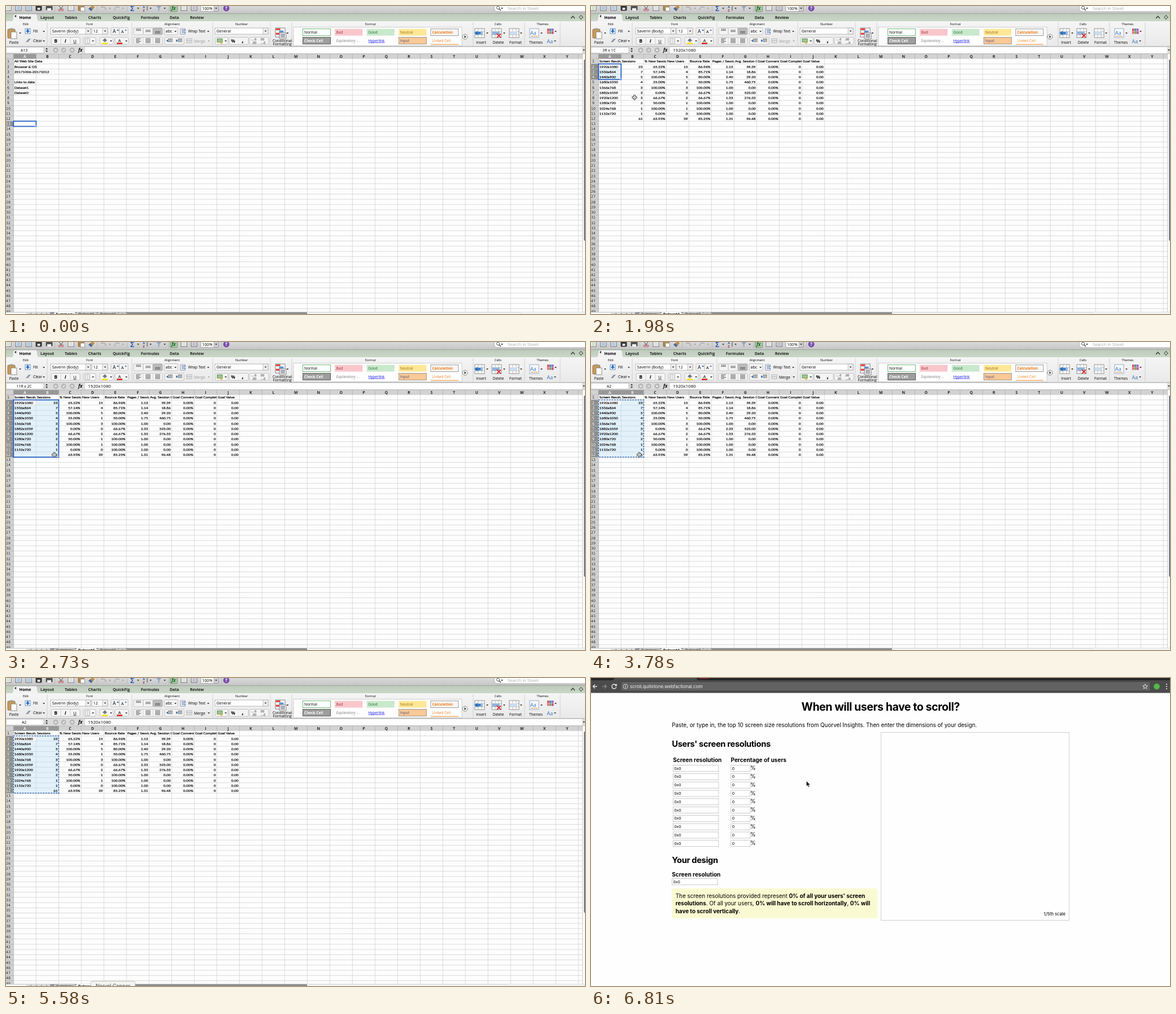
An HTML page that plays this animation: 1025 by 546 pixels, repeating every 8000 ms.

```html
<!DOCTYPE html>
<html lang="en">
<head>
<meta charset="utf-8">
<title>Spreadsheet to scroll checker</title>
<style>
html, body { margin: 0; width: 100%; height: 100%; overflow: hidden; background: #fff; }
svg#stage { display: block; width: 100vw; height: 100vh; }
text { font-family: "Open Sans", sans-serif; fill: #000; }
.cell { font-family: Lato, Carlito, sans-serif; stroke: #000; stroke-width: .2px; }
.web { font-family: Inter, sans-serif; }
.num { font-family: "DejaVu Sans", sans-serif; }
.m { text-anchor: middle; }
.e { text-anchor: end; }
.b { font-weight: 700; }
.h { font-weight: 700; letter-spacing: -.022em; }
.i { font-style: italic; }
</style>
</head>
<body>
<svg id="stage" viewBox="0 0 1025 546" xmlns="http://www.w3.org/2000/svg"></svg>
<script>
const LOOP = 8000;
const range = n => [...Array(n).keys()];
const each = (list, f) => list.map(f).join('');
const clamp = (v, a, b) => Math.max(a, Math.min(b, v));

// Drawing helpers, all returning SVG markup
const box = (x, y, w, h, fill, stroke, rx = 0) =>
  `<rect x="${x}" y="${y}" width="${w}" height="${h}" rx="${rx}" fill="${fill || 'none'}"${stroke ? ` stroke="${stroke}" stroke-width=".8"` : ''}/>`;
const txt = (x, y, s, size, cls = '', fill = '') =>
  `<text x="${x}" y="${y}" font-size="${size}" class="${cls}"${fill ? ` style="fill:${fill}"` : ''}>${s}</text>`;
const line = (d, stroke, w = .8, fill = 'none') =>
  `<path d="${d}" fill="${fill}" stroke="${stroke}" stroke-width="${w}"/>`;
const shape = (d, fill) => `<path d="${d}" fill="${fill}"/>`;
const dot = (x, y, r, fill, stroke = 'none') =>
  `<circle cx="${x}" cy="${y}" r="${r}" fill="${fill}" stroke="${stroke}" stroke-width=".8"/>`;
const drop = (x, y, c = '#333') => shape(`M${x - 1.9} ${y - 1}h3.8l-1.9 2.6z`, c);
const grad = (id, a, b) =>
  `<linearGradient id="${id}" x2="0" y2="1"><stop stop-color="${a}"/><stop offset="1" stop-color="${b}"/></linearGradient>`;
const group = (id, s) => `<g id="${id}">${s}</g>`;

// Sheet geometry
const COL = 40, ROW = 9.234;
const X = c => 13.3 + COL * c;
const Y = r => 93.4 + ROW * (r - 1);
const colName = (c, fill) => txt(X(c) + 20, 91.7, String.fromCharCode(65 + c), 6.8, 'm b', fill);
const rowName = (r, fill) => txt(4, Y(r) + 7, r, 6.3, 'm num', fill);

function toolbar() {
  const mini = (x, fill, ink) => box(x - 5, -3, 10, 11, fill, '#555') + line(`M${x - 3} 2h6M${x - 3} 5h6`, ink);
  return box(0, 0, 1025, 14, 'url(#top)') +
    mini(4, '#fff', '#4b9b4b') + mini(22, '#dfeaf7', '#2c62a8') + mini(40, '#d8e8f2', '#3d7fae') +
    box(53, -3, 10, 11, '#333', '#222', 1) + box(55.5, 3, 5, 4, '#ddd') +
    box(71, 0, 11, 7, '#555', '#333', 1) + box(73, 4, 7, 4, '#fff') +
    line('M94 0l5 6M101 0l-5 6', '#444', 1) + dot(95, 7, 1.8, 'none', '#b33') + dot(100, 7, 1.8, 'none', '#b33') +
    mini(115, '#fff', '#888') + box(128, -3, 10, 11, '#b98949', '#7a5a30', 1) + box(132, 2, 7, 7, '#fff', '#888') +
    shape('M146 5l7-6 4 3-6 7z', '#c58a3c') + shape('M146 5l3-3 4 4-2 3z', '#3a6cb0') +
    line('M168 3q7-4 9 4', '#b9a9a0', 1.6) + drop(184, 4, '#999') + line('M201 3q-7-4-9 4', '#a6b4be', 1.6) + drop(207, 4, '#999') +
    txt(220, 9, 'Σ', 12, 'b', '#2a5fb4') + drop(234, 4) +
    txt(242, 4, 'A', 6, 'b', '#2a5fb4') + txt(242, 10, 'Z', 6, 'b', '#a33') + line('M250 0v8', '#444', 1) + drop(256, 4) +
    shape('M266 0h9l-3.5 4v5l-2-1v-4z', '#8fa6bd') + drop(281, 4) +
    box(290.5, -3, 13, 13, '#a8c8a2', '#658a62', 2) + txt(293, 7, 'fx', 8, 'i b', '#135c1c') +
    mini(315, '#f4f4f4', '#aaa') + mini(333, '#d6e4f4', '#b05050') +
    box(345, -2, 31, 11.5, '#fff', '#999') + box(368, -2, 8, 11.5, '#cfcfcf', '#999') + txt(347, 7, '100%', 7.3) + drop(372, 4) +
    dot(390, 4, 5, '#7d4db3', '#5c3590') + txt(390, 7, '?', 8, 'm b', '#fff') +
    line('M86.5 0v11M161.5 0v11M214.5 0v11M287.5 0v11M381.5 0v11', '#aaa', .6) +
    box(864, -3, 170, 13, '#fff', '#999', 6) + dot(871, 3, 2.6, 'none', '#333') + line('M873 5l3 3', '#333', 1.2) +
    drop(878, 4) + txt(888, 7, 'Search in Sheet', 7.7, '', '#aaa');
}

function tabs() {
  const names = [['Layout', 73], ['Tables', 115], ['Charts', 157], ['QuickFig', 204], ['Formulas', 255], ['Data', 298], ['Review', 338]];
  return box(0, 13.5, 1025, 13.5, 'url(#tab)') + line('M0 13.5h1025', '#8d978c', .7) +
    shape('M10 27q3-1 3-6v-3q0-3.5 4-3.5h34q4 0 4 3.5v3q0 5 3 6z', '#f2f2f2') +
    shape('M15 18l3-2.6v5.2z', '#333') + txt(34, 22.7, 'Home', 7.1, 'm b') +
    each(names, ([s, x]) => txt(x, 22.7, s, 7, 'm b', '#222')) +
    line('M1000 22l3.5-4 3.5 4', '#333', 1.3) + dot(1018, 20, 2.6, 'none', '#444') +
    line('M1018 16v2M1018 22v2M1014 20h2M1020 20h2', '#444', 1.2);
}

function gallery() {
  const styles = [
    ['Normal', '#fff', '#49a855', '', '#000'], ['Bad', '#f8c7cc', '', '', '#a5343c'], ['Good', '#cae8cc', '', '', '#20752c'],
    ['Neutral', '#ffe798', '', '', '#a06c10'], ['Calculation', '#f6f6f6', '#888', 'b', '#ee7d18'],
    ['Check Cell', '#9e9e9e', '#444', 'b', '#fff'], ['Explanatory ...', '#fff', '', 'i', '#808080'], ['Hyperlink', '#fff', '', '', '#1414e6'],
    ['Input', '#fbc996', '#888', '', '#4a4a7c'], ['Linked Cell', '#fff', '', '', '#f08020']];
  return box(509, 37.5, 298, 33, '#fdfdfd', '#c4c4c4') +
    each(styles, ([s, fill, edge, cls, ink], i) => {
      const x = 525.5 + 56.6 * (i % 5), y = i < 5 ? 40.5 : 55.5;
      return box(x, y, 49, 12, fill, edge) + txt(x + 2.5, y + 8.3, s, 6.5, cls, ink);
    }) +
    line('M641.5 65h29', '#1414e6', .7) + line('M752 68h49', '#f08020', 1) +
    dot(812.5, 54.5, 4.5, '#eee', '#777') + shape('M811.5 52l3 2.5-3 2.5z', '#333');
}

function ribbon() {
  const groups = [['Edit', 35], ['Font', 148], ['Alignment', 294], ['Number', 417], ['Format', 645], ['Cells', 871], ['Themes', 950]];
  const bars = (x, y, ws, c = '#555') => each(ws, (w, i) => box(x, y + i * 2.3, w, 1, c));
  const btn = (x, y, w, fill = '#f4f4f4') => box(x, y, w, 12.5, fill, '#b5b5b5', 1.5);
  const field = (x, w, s) => box(x, 39, w, 11, '#fff', '#a5a5a5') + box(x + w - 9, 39, 9, 11, '#eee', '#b5b5b5') +
    drop(x + w - 4.5, 44.5) + txt(x + 2.5, 47.2, s, 7);
  const table = (x, ink) => box(x - 8, 40, 17, 16, '#fff', '#777') + line(`M${x - 8} 45.5h17M${x - 8} 51h17M${x - 2} 40v16M${x + 4} 40v16`, '#999', .7) + box(x - 7, 45, 13, 6, ink);
  return box(0, 27, 1025, 44.5, 'url(#rib)') +
    each([73, 223, 366, 468, 506, 827, 918, 981], x => line(`M${x} 29v41`, '#c4c4c4', .7)) +
    each(groups, ([s, x]) => txt(x, 34.3, s, 5.7, 'm')) +
    // Edit
    box(3, 41, 13, 16, '#c79a5a', '#85602c', 1.5) + box(6.5, 39.5, 6, 3, '#999') + box(9, 46, 10, 12, '#fff', '#777') + drop(25, 48) +
    txt(14, 67, 'Paste', 6.5, 'm') +
    box(34, 40, 9, 9, '#e4eefa', '#4a83c4') + shape('M37 41h3v3h2l-3.5 4-3.5-4h2z', '#2e70bd') + txt(48, 47.3, 'Fill', 6.6) + drop(67, 45) +
    shape('M35 64l5-6h4l-5 6z', '#8a98ae') + txt(48, 64.3, 'Clear', 6.6) + drop(67, 62) +
    // Font
    field(79, 71, 'Saverin (Body)') + field(152, 28, '12') +
    btn(186, 38.5, 15) + btn(201, 38.5, 15) + txt(189, 48, 'A', 8.5) + txt(204, 47.5, 'A', 7) +
    shape('M196 44l2-3 2 3z', '#2e70bd') + drop(212, 43, '#2e70bd') +
    btn(80, 55.5, 51) + line('M97 55.5v12.5M114 55.5v12.5', '#c5c5c5', .7) +
    txt(88, 65, 'B', 8.5, 'm b') + txt(105, 65, 'I', 8.5, 'm i b') + txt(122, 64.5, 'U', 8, 'm') + line('M119 66.3h6', '#111', .7) +
    btn(137, 55.5, 22) + box(140, 58, 8, 8, '#fff', '#999') + line('M144 58v8M140 62h8', '#aaa', .6) + drop(154, 62) +
    btn(166, 55.5, 24) + shape('M171 61l4-4 4 4-4 3z', '#778') + box(170, 65, 10, 2.5, '#ffe600') + drop(186, 62) +
    btn(193, 55.5, 24) + txt(201, 64, 'A', 8, 'm') + box(196, 65, 10, 2.5, '#e02020') + drop(213, 62) +
    // Alignment
    btn(226, 38.5, 17) + btn(243, 38.5, 17) + btn(260, 38.5, 17, '#b9b9b9') +
    bars(230, 40.5, [9, 9]) + bars(247, 42.5, [9, 9]) + bars(264, 45, [9, 9]) +
    btn(280, 38.5, 24) + txt(282.5, 47.3, 'abc', 7) + drop(300, 45) +
    box(309, 40, 8, 10, '#fff', '#778') + bars(311, 42, [7, 5, 7], '#2e70bd') + txt(322.5, 47.3, 'Wrap Text', 6.6) + drop(358, 45) +
    btn(226, 55.5, 51) + line('M243 55.5v12.5M260 55.5v12.5', '#c5c5c5', .7) +
    bars(230, 57.5, [9, 6, 9, 6]) + bars(247, 57.5, [9, 9, 9, 9]) + bars(264, 57.5, [9, 9, 9, 9]) +
    btn(281, 55.5, 34) + bars(287, 58, [8, 8, 8]) + bars(304, 58, [8, 8, 8]) +
    shape('M287 59v5l-3.5-2.5zM301 59v5l3.5-2.5z', '#2e70bd') +
    box(320, 58, 9, 7, '#e6e6e6', '#aaa') + line('M320 61.5h9', '#aaa') +
    // Number
    field(370, 94, 'General') + btn(371, 55.5, 22) + box(374, 58, 9, 6, '#9cc78f', '#4c7b40') + dot(381, 65, 2, '#d9b13c') + drop(389, 62) +
    btn(395, 55.5, 34) + txt(402, 64.7, '%', 8, 'm b') + txt(419, 64, ',', 12, 'm b') + btn(431, 55.5, 34) +
    txt(434, 61, '←.0', 5) + txt(436, 66.5, '.00', 5) + txt(450, 61, '.00', 5) + txt(450, 66.5, '→.0', 5) +
    // Conditional formatting
    box(477, 39, 17, 16, '#fff', '#666') + each(range(4), i => box(477.5 + (i % 2) * 6, 39.5 + i * 4, 8, 3.5, i % 2 ? '#5c8fd0' : '#df4b4b')) +
    box(484, 48, 12, 10, '#f7f7f7', '#666') + bars(486, 50, [8, 8, 8], '#556') + drop(498.5, 48) +
    txt(489, 64, 'Conditional', 6.4, 'm') + txt(489, 70, 'Formatting', 6.4, 'm') + gallery() +
    // Cells and themes
    table(838, '#8fb5e0') + table(868, '#8fb5e0') + table(899, '#cbdcef') +
    shape('M829 48l6-4v2.5h5v3h-5v2.5z', '#2e70bd') + line('M869 49l7 7M876 49l-7 7', '#d33', 1.8) +
    drop(852, 48) + drop(882, 48) + drop(912, 48) +
    txt(841, 67, 'Insert', 6.5, 'm') + txt(871.5, 67, 'Delete', 6.5, 'm') + txt(902, 67, 'Format', 6.5, 'm') +
    box(927, 40, 16, 16, '#f5f9ff', '#8a9ab0') + txt(928, 51, 'Aa', 9, '', '#3370b5') + bars(929, 53, [12], '#d79b45') + drop(948, 48) +
    txt(938, 67, 'Themes', 6.5, 'm') +
    each(['#c55', '#58a', '#a6c', '#e68', '#7a5', '#b59'], (c, i) => box(958 + (i % 3) * 4, 40 + (i > 2) * 5, 3.5, 4.5, c)) + drop(973, 45) +
    txt(957.5, 65.5, 'Aa', 9, '', '#3370b5') + drop(972, 62);
}

function grid() {
  const v = each(range(26), i => `M${X(i)} 93V543`);
  const h = each(range(50), i => `M13 ${Y(i + 1)}H1020`);
  return box(0, 71.5, 1025, 13.5, '#dcdcdc') + line('M0 71.7h1025', '#999', .7) +
    box(0, 73, 67, 10.5, '#fff', '#b0b0b0') + shape('M70 77l2-3 2 3zM70 79l2 3 2-3z', '#333') +
    each([88, 102, 117], x => dot(x, 78.3, 4, '#c2c2c2', '#a0a0a0')) +
    line('M86.5 77l3 3M89.5 77l-3 3M100 78.5l1.5 1.5 2.5-3.5', '#fff', 1) + drop(117, 78.5, '#fff') +
    txt(128, 81, 'fx', 8, 'i b') + box(140, 73, 880, 10.5, '#fff') + drop(1023, 78) +
    box(0, 85, 1025, 461, '#fdfdfd') + line(v + h, '#cfcfcf', .75) +
    box(0, 85, 1025, 8.4, '#d2d2d2') + box(0, 93.4, 13.3, 453, '#d2d2d2') +
    line(each(range(26), i => `M${X(i)} 85v8.4`) + each(range(50), i => `M0 ${Y(i + 1)}h13.3`) + 'M0 85h1025M13.3 93v450', '#a4a4a4', .6) +
    each(range(25), i => colName(i, '#222')) + each(range(49), i => rowName(i + 1, '#222')) +
    box(1020.5, 85, 5, 461, '#fafafa') + line('M1020.5 85v461', '#bbb', .7) + box(1023.4, 95, 3, 321, '#53617c', '', 1);
}

const summary = [[1, 'All Web Site Data'], [2, 'Browser &amp; OS'], [3, '20171006-20171012'], [5, 'Links to data:'], [6, 'Dataset1'], [7, 'Dataset2']];
const heads = 'Screen Resolution,Sessions,% New Sessions,New Users,Bounce Rate,Pages / Session,Avg. Session Duration,Goal Conversion Rate,Goal Completions,Goal Value'.split(',');
const data = `1920x1080 23 65.22% 15 86.96% 1.13 59.39
1536x864 7 57.14% 4 85.71% 1.14 18.86
1440x900 5 100.00% 5 80.00% 2.40 29.20
1680x1050 4 25.00% 1 50.00% 1.75 460.75
1366x768 3 100.00% 3 100.00% 1.00 0.00
1882x1059 3 0.00% 0 66.67% 2.33 523.00
1920x1200 3 66.67% 2 66.67% 1.33 276.33
1280x720 2 50.00% 1 100.00% 1.00 0.00
1024x768 1 100.00% 1 100.00% 1.00 0.00
1152x720 1 0.00% 0 100.00% 1.00 0.00
- 61 63.93% 39 85.25% 1.31 96.48`.split('\n').map(r => (r + ' 0.00% 0 0.00').split(' '));
const cell = (c, r, s) => c ? txt(X(c + 1) - 1.8, Y(r) + 7, s, 6.4, 'cell e') : txt(X(0) + 1.5, Y(r) + 7, s, 6.4, 'cell');

const sheet1 = () => each(summary, ([r, s]) => cell(0, r, s));
const sheet2 = () =>
  each(heads, (s, c) => `<svg x="${X(c)}" y="93.4" width="39.6" height="9.2">${txt(1.5, 7, s, 6.4, 'cell')}</svg>`) +
  each(data, (row, i) => each(row, (s, c) => s === '-' ? '' : cell(c, i + 2, s)));

function bottom(second) {
  const tab = (x, w, s, on) => shape(`M${x} 546l3-3.5h${w - 6}l3 3.5z`, on ? '#fff' : '#c6c6c6') +
    txt(x + w / 2, 549.2, s, 6.6, 'm ' + (on ? 'b' : ''));
  return box(0, 542.5, 1025, 4, '#8f8f8f') + box(0, 542.5, 82, 4, '#dedede') + box(0, 544, 35, 3, '#fff') +
    shape('M42 546l3-2.5v2.5zM52 546l3-2.5v2.5zM62 543.5l3 2.5h-3zM71 543.5l3 2.5h-3z', '#999') + box(78, 543, 6, 4, '#8895a8') +
    tab(84, 40, 'Summary', !second) + tab(123, 39, 'Dataset1', second) + tab(161, 39, 'Dataset2') + tab(198, 16, '+') +
    box(533, 542.5, 492, 4, '#f4f4f4') + box(536, 543.8, second ? 352 : 375, 5, '#fdfdfd', '#d2d2d2', 2);
}

// Selected range with highlighted headers; ants >= 0 gives the dashed copy border
function selection({ c, r, w, h, ants, name, value }) {
  const x = X(c), y = Y(r), W = w * COL, H = h * ROW;
  const frame = (stroke, width, more = '') =>
    `<rect x="${x}" y="${y}" width="${W}" height="${H}" fill="none" stroke="${stroke}" stroke-width="${width}" ${more}/>`;
  return each(range(w), i => box(X(c + i), 85, COL, 8.4, '#989898') + colName(c + i, '#eee')) +
    each(range(h), i => box(0, Y(r + i), 13.3, ROW, '#8d8d8d', '#b5b5b5') + rowName(r + i, '#fff')) +
    (w * h > 1 ? `<path d="M${x} ${y}h${W}v${H}h${-W}zM${x} ${y}h${COL}v${ROW}h${-COL}z" fill="#b5dcf5" fill-opacity=".38" fill-rule="evenodd"/>` : '') +
    (ants < 0 ? frame('#1f5bbd', 1.7)
      : frame('#dfeefa', 1.6) + frame('#1c4f94', 1.3, `stroke-dasharray="3 1.6" stroke-dashoffset="${-ants * 1.5}"`)) +
    box(x + W - 1.5, y + H - 1.5, 3, 3, '#1f5bbd', '#fff') +
    txt(32, 80.7, name, 6.8, 'm') + txt(145, 81, value, 8);
}

function page() {
  const field = (x, y, w, s) => box(x, y, w, 11, '#fff', '#bcbcbc') + txt(x + 2, y + 8, s, 6.8, 'web');
  const rows = each(range(10), i => {
    const y = 154.7 + 14.78 * i;
    return field(145.3, y, 80.5, '0x0') + field(247.8, y, 34, '0') + txt(282, y + 8.5, '%', 9.7, 'web');
  });
  const b = s => `<tspan class="b">${s}</tspan>`;
  return box(0, 0, 1025, 546, '#fefefe') + box(0, 0, 1025, 5, '#252529') + shape('M38 5l4-5h144l4 5z', '#4b4b4b') + box(192, 0, 16, 1.5, '#7d2328') +
    box(0, 4, 1025, 22.5, '#4b4b4b') + box(53, 6.5, 937, 16.5, '#626262', '#404040', 2) +
    line('M11 15H3.5M7 11.5L3.5 15l3.5 3.5', '#e8e8e8', 1.3) + line('M20 15h7.5M24 11.5l3.5 3.5-3.5 3.5', '#888', 1.3) +
    line('M44.5 13a4 4 0 1 0 .3 3.2', '#e8e8e8', 1.4) + shape('M45.8 10v4.3h-4.3z', '#e8e8e8') +
    dot(61, 15, 4, 'none', '#eee') + box(60.5, 14.2, 1, 3, '#eee') + box(60.5, 12.3, 1, 1, '#eee') +
    txt(69, 17.8, 'scroll.quillstone.webfactional.com', 8, 'web', '#f4f4f4') +
    line('M981 10.8l1.2 2.9 3.1.2-2.4 2 .8 3-2.7-1.7-2.7 1.7.8-3-2.4-2 3.1-.2z', '#eee', .9) +
    dot(1001.5, 15, 5.3, '#55b848') + each([11, 15, 19], y => dot(1019, y, 1.1, '#eee')) +
    txt(512.7, 58.3, 'When will users have to scroll?', 19.5, 'web h m') +
    txt(143.3, 86.8, 'Paste, or type in, the top 10 screen size resolutions from Quorvel Insights. Then enter the dimensions of your design.', 9.82, 'web') +
    txt(143.3, 122.3, "Users' screen resolutions", 14.64, 'web h') +
    txt(145.3, 149, 'Screen resolution', 10, 'web b') + txt(247.5, 149, 'Percentage of users', 10, 'web b') + rows +
    txt(143.3, 327.5, 'Your design', 14.64, 'web h') + txt(143.3, 352.2, 'Screen resolution', 10, 'web b') + field(143.5, 355.7, 80.5, '0x0') +
    box(143.3, 373, 363.7, 53, '#fafad2') +
    txt(149.7, 389.5, 'The screen resolutions provided represent ' + b("0% of all your users' screen"), 9.9, 'web') +
    txt(149.7, 403.2, b('resolutions') + '. Of all your users, ' + b('0% will have to scroll horizontally') + ', ' + b('0% will'), 9.9, 'web') +
    txt(149.7, 416.8, b('have to scroll vertically') + '.', 9.9, 'web') +
    box(513.3, 96.5, 333, 333, '#fefefe', '#c4c4c4') + txt(840, 421.3, '1/5th scale', 7.6, 'web e');
}

const tip = box(150, 537.5, 78.7, 14, '#f3f3f0', '#bdbdbd', 3) + txt(189.3, 549, 'Norvel Copper', 8.9, 'web m', '#444');
const cursors = {
  cross: line('M-1.4-4.1h2.8v2.7h2.7v2.8h-2.7v2.7h-2.8v-2.7h-2.7v-2.8h2.7z', '#333', .9, '#fff') + line('M0-2.6v5.2M-2.6 0h5.2', '#999', .6),
  resize: shape('M-.8-5h1.6V5h-1.6zM-2-.6v-2l-3 2.6 3 2.6v-2h4v2l3-2.6-3-2.6v2z', '#000'),
  beam: line('M-2-7.5q2 0 2 1.5v12q0 1.5-2 1.5M2-7.5q-2 0-2 1.5M2 7.5q-2 0-2-1.5', '#222', .9),
  arrow: line('M0 0v9.6l2.2-2 1.6 3.5 1.5-.7-1.5-3.3h3z', '#fff', .6, '#000')
};

// Pointer moves: start, end, shape, evenly timed stops
const moves = [
  [690, 1530, 'cross', [[138, 541], [121, 420], [96, 290], [66, 180], [45, 124], [37, 108]]],
  [1830, 2730, 'cross', [[38, 110], [77, 162], [84, 184], [86, 193], [86, 198], [86, 200], [85.5, 200]]],
  [4380, 5280, 'cross', [[138, 134], [173.5, 93, 'resize'], [228, 160], [243, 270], [226, 400], [205, 500], [190, 560]]],
  [6030, 6030, 'beam', [[168, 409]]],
  [6360, 6810, 'arrow', [[222, 330], [312, 242], [366, 196], [381.3, 182.5]]]
];
const stepOf = (t, t0, t1, n) => n < 2 ? 0 : clamp(Math.floor((t - t0) / (t1 - t0) * (n - 1) + 1e-6), 0, n - 1);

function pointer(t) {
  const move = moves.filter(m => t >= m[0]).pop();
  if (!move) return '';
  const [t0, t1, kind, stops] = move;
  const [x, y, own] = stops[stepOf(t, t0, t1, stops.length)];
  return `<g transform="translate(${x} ${y})">${cursors[own || kind]}</g>`;
}

function picked(t) {
  if (t < 300) return { c: 0, r: 13, w: 1, h: 1, ants: -1, name: 'A13', value: '' };
  if (t < 1830) return { c: 11, r: 7, w: 1, h: 1, ants: -1, name: 'L7', value: '' };
  const i = stepOf(t, 1830, 2730, 7);
  const h = [1, 3, 7, 9, 10, 11, 11][i], w = i < 2 ? 1 : 2;
  const ants = t < 3780 ? -1 : stepOf(t, 3780, 4080, 3) + (t < 4380 ? 0 : 1 + stepOf(t, 4380, 5280, 7));
  return { c: 0, r: 2, w, h, ants, name: i && t < 3030 ? `${h}R x ${w}C` : 'A2', value: '1920x1080' };
}

const merge = on => txt(333, 64.5, 'Merge', 6.6, '', on ? '#000' : '#9a9a9a') + drop(359, 62, on ? '#333' : '#aaa');

const stage = document.getElementById('stage');
stage.innerHTML = `<defs>${grad('top', '#d9d9d9', '#c4c4c4')}${grad('tab', '#bccbba', '#cbd7c9')}${grad('rib', '#f5f5f5', '#e9e9e9')}</defs>` +
  group('book', toolbar() + tabs() + ribbon() + group('merge', '') + grid() + group('pick', '') +
    group('first', sheet1() + bottom(false)) + group('second', sheet2() + bottom(true))) +
  group('page', page()) + group('tip', tip) + group('pointer', '');

const part = id => document.getElementById(id);
const last = {};
function put(id, s) {
  if (last[id] !== s) part(id).innerHTML = last[id] = s;
}
const show = (id, on) => part(id).setAttribute('display', on ? 'inline' : 'none');

function draw(t) {
  const web = t >= 5730;
  show('book', !web);
  show('page', web);
  show('first', t < 300);
  show('second', t >= 300);
  show('tip', t >= 5430 && t < 6360);
  put('pick', selection(picked(t)));
  put('merge', merge(t >= 3180));
  put('pointer', pointer(t));
}

const begin = performance.now();
function tick() {
  draw((performance.now() - begin) % LOOP);
  requestAnimationFrame(tick);
}
tick();
</script>
</body>
</html>
```
